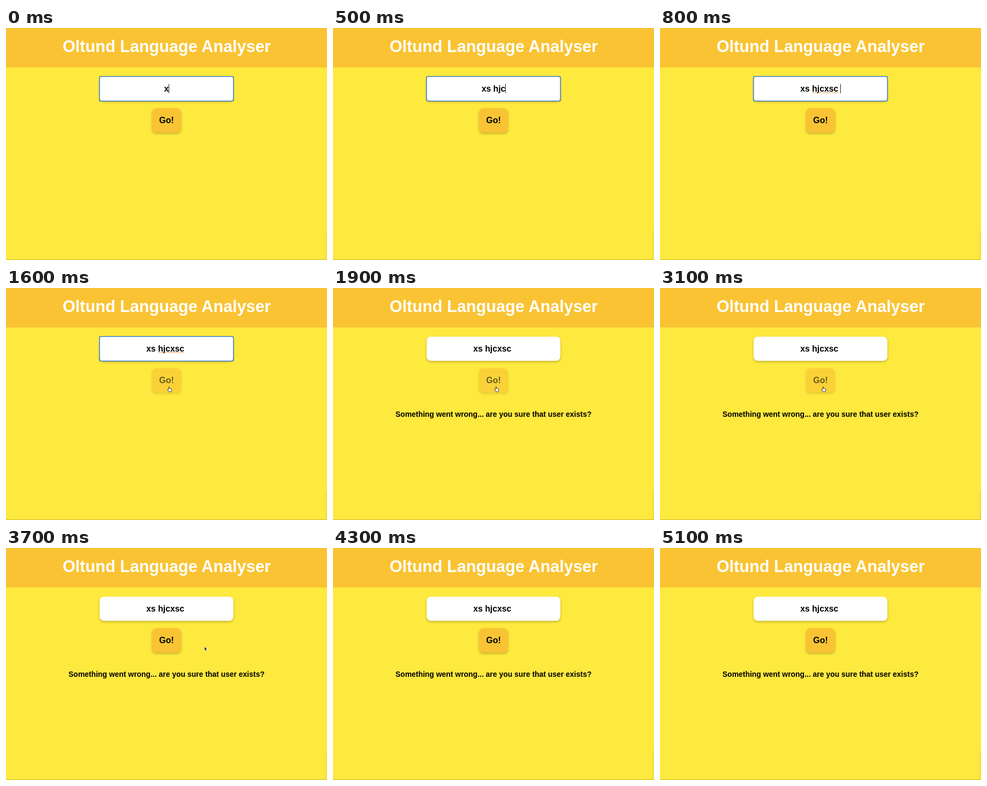
An HTML page that plays this animation: 600 by 434 pixels, repeating every 5.2 s.

```html
<!DOCTYPE html>
<html lang="en">
<head>
<meta charset="utf-8">
<title>Language Analyser</title>
<style>
  html, body { margin: 0; width: 100%; height: 100%; overflow: hidden; background: #fee93e; }
  svg { display: block; width: 600px; height: 434px; }
  text { font-family: "Liberation Sans", Arial, sans-serif; font-weight: bold; text-anchor: middle; white-space: pre; }
  .raised { filter: drop-shadow(0 2px 2px rgba(0, 0, 0, .24)); }
</style>
</head>
<body>
<svg viewBox="0 0 600 434">
  <defs>
    <filter id="soft" x="-200%" y="-50%" width="500%" height="200%"><feGaussianBlur stdDeviation="4"/></filter>
  </defs>
  <rect width="600" height="434" fill="#fee93e"/>
  <rect x="602" y="380" width="20" height="60" fill="#000" opacity=".18" filter="url(#soft)"/>
  <rect y="433" width="600" height="1" fill="#000" opacity=".2"/>
  <rect width="600" height="73.7" fill="#f9c333"/>
  <text x="300.3" y="45" font-size="30.7" fill="#fff">Oltund Language Analyser</text>

  <rect class="raised" x="175" y="91" width="250" height="45.3" rx="8" fill="#fff"/>
  <g id="focus" fill="none">
    <rect x="175.8" y="91.6" width="248.4" height="44" rx="2" stroke="#fff"/>
    <rect x="174.8" y="90.6" width="250.4" height="46" rx="2" stroke="#1b6ad6" stroke-width="1.3"/>
  </g>
  <text id="entry" x="300" y="118.5" font-size="15.75" xml:space="preserve"></text>
  <path id="spelling" stroke="#e58a3a" stroke-width="1.4" stroke-dasharray="1.5 1.2"/>
  <path id="caret" stroke="#222" stroke-width="1"/>

  <g id="button">
    <rect class="raised" x="273" y="150.3" width="54" height="45.5" rx="8" fill="#f9c333"/>
    <text x="300" y="178" font-size="15.9">Go!</text>
  </g>
  <text id="error" x="300" y="241" font-size="13.95">Something went wrong... are you sure that user exists?</text>

  <path id="hand" transform="translate(301 184)" fill="#fff" stroke="#222" stroke-width=".9" stroke-linejoin="round"
    d="M3 6V1.3Q3.7 .2 4.5 1.3V4Q5.4 3.3 6 4.3Q7 3.7 7.4 4.8Q8.6 4.5 8.7 5.8V7.5L7.7 10H3.6L1 6.7Q1 5.2 2.2 5.6Z"/>
  <path id="arrow" fill="#111" stroke="#fff" stroke-width=".7" d="M0 0V7.6L1.7 6.1L2.9 8.9L4.2 8.3L3 5.6H5.2Z"/>
</svg>
<script>
  const LOOP = 5200, STEP = 100;
  const PHRASE = "xs hjcxsc ";
  // [time, characters typed]
  const TYPING = [[0, 1], [100, 2], [200, 4], [400, 5], [500, 6], [600, 7], [700, 9], [800, 10]];
  const HOVER = 1000, CARET_OFF = 1300, BLUR = 1700, FAIL = 1900, LEAVE = 3600, GONE = 3900;

  const get = id => document.getElementById(id);
  const show = (id, visible) => get(id).setAttribute("visibility", visible ? "visible" : "hidden");
  const clamp = v => Math.max(0, Math.min(1, v));

  function drawEntry(t) {
    const count = TYPING.filter(([at]) => at <= t).pop()[1];
    const entry = get("entry");
    const value = PHRASE.slice(0, count);
    if (entry.textContent !== value) entry.textContent = value;

    const half = entry.getComputedTextLength() / 2;
    const caretX = Math.floor(300 + half) + .5;
    get("caret").setAttribute("d", `M${caretX} 104.5V122`);
    show("caret", t < CARET_OFF);

    const complete = count === PHRASE.length;
    if (complete) {
      const from = 300 - half + entry.getSubStringLength(0, 3);
      const to = 300 - half + entry.getSubStringLength(0, 9);
      get("spelling").setAttribute("d", `M${from} 120.8H${to}`);
    }
    show("spelling", complete && t < BLUR);
    show("focus", t < BLUR);
  }

  function drawPointer(t) {
    const hover = clamp((t - HOVER + STEP) / 200) - clamp((t - LEAVE + STEP) / 200);
    get("button").setAttribute("opacity", 1 - .4 * hover);
    show("hand", t >= HOVER && t < LEAVE);
    show("arrow", t >= LEAVE && t < GONE);
    const x = 371 + (t - 3700) * .35;
    get("arrow").setAttribute("transform", `translate(${x} 184.3)`);
  }

  function render(now) {
    const t = Math.floor((now % LOOP) / STEP) * STEP;
    drawEntry(t);
    drawPointer(t);
    show("error", t >= FAIL);
  }

  const start = performance.now();
  function tick() {
    render(performance.now() - start);
    requestAnimationFrame(tick);
  }
  tick();
</script>
</body>
</html>
```
